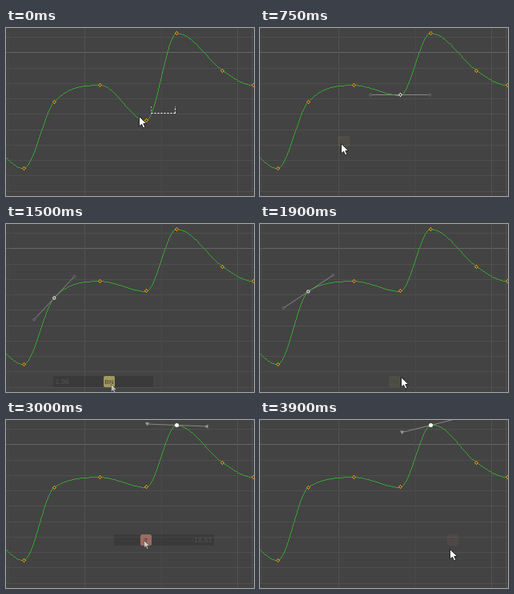
An HTML page with a canvas for the animation above (3.95 s loop, 310 by 210 pixels).

```html
<!DOCTYPE html>
<html lang="en">
<head>
<meta charset="utf-8">
<title>Curve editor</title>
<style>
  html, body { margin: 0; width: 100%; height: 100%; overflow: hidden; background: #434343; }
  canvas { display: block; width: 310px; height: 210px; }
</style>
</head>
<body>
<canvas id="stage" width="310" height="210"></canvas>
<script>
const g = document.getElementById('stage').getContext('2d');
const LOOP = 3950, STEP = 50, UNIT = 19.15, ARM = 37, LAG = 12;
const FONT = '"Liberation Sans", Arial, sans-serif';

const clamp = (v, lo, hi) => Math.min(hi, Math.max(lo, v));
const mix = (a, b, u) => a + (b - a) * u;
const ease = u => u * u * (3 - 2 * u);
const progress = (t, from, to) => clamp((t - from) / (to - from), 0, 1);

// Pointer strokes: from, to, x, y, sideways bow
const strokes = [
  [0, 240, 153.5, 148], [250, 580, 104.5, 148],
  [700, 1050, 45, 75], [1050, 1200, 72, 104],
  [1200, 1400, 121.5, 200], [1418, 1700, 168, 200],
  [1850, 2250, 195, 0, 50], [2250, 2400, 221, 11],
  [2400, 2700, 225, 190, 48], [2700, 2860, 197.5, 150],
  [2864, 3168, 136.5, 150], [3168, 3660, 241, 150],
  [3800, 3900, 237, 161]
];

// One slider drag per key
const drags = [
  { from: 250, to: 580, gone: 800, x: 153.5, y: 142, tag: 'BN', color: '#e6d878' },
  { from: 1418, to: 1700, gone: 1950, x: 121.5, y: 197, tag: 'BN', color: '#e6d878' },
  { from: 2864, to: 3660, gone: LOOP, x: 197.5, y: 150, tag: 'T', color: '#e08a7c' }
];

// Selection boxes: from, to, start corner, end corner
const marquees = [
  [-130, 70, 211, 98, 165, 110],
  [1050, 1200, 46, 76, 72, 104],
  [2250, 2400, 195, 0, 223, 14]
];

function pointer(t) {
  let x = 166, y = 110;
  for (const [from, to, x2, y2, bow = 0] of strokes) {
    const u = ease(progress(t, from, to));
    x = mix(x, x2, u) + bow * Math.sin(Math.PI * u);
    y = mix(y, y2, u);
  }
  return { x, y };
}

// The slider trails the pointer; its value grows with the square of the offset
function offset(d, t) {
  return t < d.from ? 0 : pointer(clamp(t - LAG, d.from, d.to)).x - d.x;
}

function value(d, t) {
  const o = offset(d, t);
  return .038 * o * Math.abs(o);
}

function line(x1, y1, x2, y2, color) {
  g.strokeStyle = color;
  g.beginPath();
  g.moveTo(x1, y1);
  g.lineTo(x2, y2);
  g.stroke();
}

function poly(points, fill, stroke) {
  g.beginPath();
  points.forEach(([x, y]) => g.lineTo(x, y));
  g.closePath();
  g.fillStyle = fill;
  g.fill();
  if (stroke) { g.strokeStyle = stroke; g.stroke(); }
}

// Pixel diamond with a dark core
function diamond(x, y, color) {
  x = Math.floor(x);
  y = Math.floor(y);
  for (let i = -2; i <= 2; i++) {
    const r = 2 - Math.abs(i);
    g.fillStyle = '#4a4030';
    g.fillRect(x - r, y + i, 2 * r + 1, 1);
    g.fillStyle = color;
    g.fillRect(x - r, y + i, 1, 1);
    g.fillRect(x + r, y + i, 1, 1);
  }
}

function grid() {
  g.fillStyle = '#434343';
  g.fillRect(0, 0, 310, 210);
  for (let i = 0; i < 11; i++) {
    const y = Math.round(11 + i * 19.27) + .5;
    line(0, y, 310, y, i === 1 ? '#666' : '#4f4f4f');
  }
  for (let i = 0; i < 4; i++) {
    const x = Math.floor(2.5 + i * 95.75) + .5;
    line(x, 0, x, 210, i % 2 ? '#525252' : '#494949');
  }
  line(307.5, 0, 307.5, 210, '#525252');
}

function hermite(a, b, x) {
  const w = b.x - a.x, s = (x - a.x) / w, r = 1 - s;
  return mix(a.y, b.y, ease(s)) + w * s * r * (a.m * r - b.m * s);
}

// Hard-edged line, one run of pixels per column
function curve(keys) {
  g.fillStyle = '#38a332';
  let i = 0;
  for (let x = 0; x < 309; x++) {
    while (keys[i + 1].x < x + .5) i++;
    const a = keys[i], b = keys[i + 1];
    const y1 = Math.round(hermite(a, b, x)), y2 = Math.round(hermite(a, b, x + 1));
    g.fillRect(x, Math.min(y1, y2), 1, Math.max(1, Math.abs(y2 - y1)));
  }
}

function handles(k, kind) {
  const dx = ARM / Math.hypot(1, k.m), dy = dx * k.m;
  const cy = Math.floor(k.y) + .5;
  line(k.x - dx, cy - dy, k.x + dx, cy + dy, '#8a878a');
  for (const s of [-1, 1]) {
    const x = k.x + s * dx, y = cy + s * dy;
    if (kind < 2) poly([[x, y - 1.8], [x + 1.8, y], [x, y + 1.8], [x - 1.8, y]], '#484848', '#757275');
    else if (s < 0) poly([[x - 2.5, y - 2], [x + 2.5, y - 2], [x, y + 2.5]], '#999');
    else poly([[x - 2, y], [x + 2, y - 2.5], [x + 2, y + 2.5]], '#999');
  }
}

function picked(k, kind) {
  if (kind === 0) return diamond(k.x, k.y, '#fff');
  g.beginPath();
  g.arc(k.x, Math.floor(k.y) + .5, kind === 1 ? 1.7 : 2.5, 0, 7);
  g.fillStyle = kind === 1 ? '#555' : '#fff';
  g.fill();
  g.strokeStyle = '#fff';
  if (kind === 1) g.stroke();
}

function slider(d, t) {
  if (t < d.from || t >= d.gone) return;
  const v = value(d, t), x = Math.round(d.x + offset(d, t)), active = t <= d.to;
  const side = v < 0 ? 1 : -1;
  g.textBaseline = 'middle';
  if (active) {
    g.globalAlpha = .13;
    g.fillStyle = '#000';
    g.fillRect(d.x - 62.5, d.y - 7, 125, 14);
    g.fillStyle = '#fff';
    g.font = '9px ' + FONT;
    g.textAlign = v < 0 ? 'right' : 'left';
    g.fillText(v.toFixed(2), d.x + side * 60, d.y + 1);
  }
  g.globalAlpha = active ? .6 : .08;
  g.fillStyle = d.color;
  g.beginPath();
  g.roundRect(x - 7, d.y - 7, 14, 14, 2);
  g.fill();
  g.fillStyle = '#2c2a20';
  g.font = 'bold 8px ' + FONT;
  g.textAlign = 'center';
  g.fillText(d.tag, x, d.y + .5);
  g.globalAlpha = 1;
}

function marquee([from, to, x1, y1, x2, y2], t) {
  if (t <= from || t >= to + STEP) return;
  const u = progress(t, from, to);
  const x = Math.round(mix(x1, x2, u)) + .5, y = Math.round(mix(y1, y2, u)) + .5;
  g.setLineDash([2, 2]);
  line(Math.min(x1 + .5, x), y1, Math.min(x1 + .5, x), y, '#b9a4b5');
  line(x1 + .5, y, x, y, '#fff');
  line(Math.max(x1 + .5, x), y, Math.max(x1 + .5, x), y1, '#fff');
  g.setLineDash([]);
}

// The pointer is small and dim while it drags a slider
function cursor({ x, y }, dragging) {
  g.save();
  g.translate(Math.round(x) + .5, Math.round(y) + .5);
  if (dragging) {
    g.scale(.75, .75);
    g.globalAlpha = .65;
  }
  poly([[0, 0], [0, 12.5], [3, 9.8], [5.2, 14.6], [7.4, 13.6], [5.3, 9], [9.3, 9]], '#fff', '#222');
  g.restore();
}

function draw(t) {
  const [v3, v1, v4] = drags.map(d => value(d, t));
  const key = (i, y, m = 0) => ({ x: 22 + i * UNIT, y, m });
  const keys = [
    key(-3, 135), key(0, 175.3),
    key(2, 92.4 - v1 * .1, -1.08 + v1 * .0051),
    key(5, 71.3),
    key(8, 115.9 + v3 * .35),
    key(10, 6.4, -.02 - v4 * .0032),
    key(13, 53.3, .68), key(15, 71.3)
  ];
  const kind = t < 100 ? -1 : t < 1200 ? 0 : t < 2450 ? 1 : 2;
  const pick = [4, 2, 5][kind];

  grid();
  curve(keys);
  if (kind >= 0) handles(keys[pick], kind);
  keys.forEach((k, i) => i === pick ? picked(k, kind) : diamond(k.x, k.y, '#f5a012'));
  drags.forEach(d => slider(d, t));
  marquees.forEach(m => marquee(m, t));
  cursor(pointer(t), drags.some(d => t >= d.from && t <= d.to));
}

const start = performance.now();
function tick() {
  const t = (performance.now() - start) % LOOP;
  draw(Math.floor(t / STEP) * STEP);
  requestAnimationFrame(tick);
}
tick();
</script>
</body>
</html>
```
